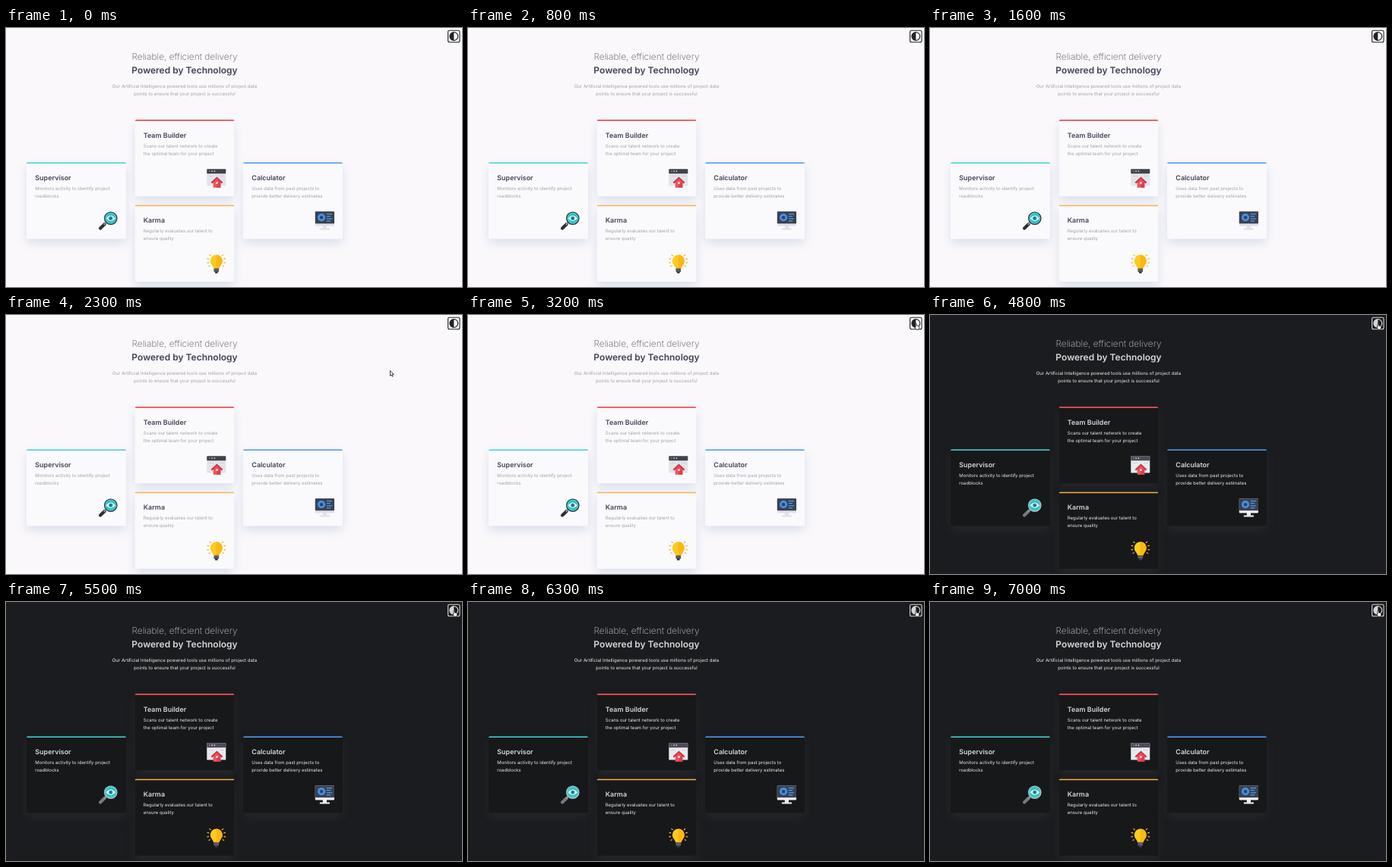
Animation, 600 px wide and 342 px high, one loop 7.1 s. Source, as an HTML page with a canvas:

```html
<!DOCTYPE html>
<html lang="en">
<head>
<meta charset="utf-8">
<title>Four cards, light and dark</title>
<style>
  html, body { margin: 0; width: 100%; height: 100%; overflow: hidden; background: #faf8fb; }
  canvas { display: block; width: 600px; height: 342px; }
</style>
</head>
<body>
<canvas id="stage"></canvas>
<script>
const W = 600, H = 342, LOOP = 7100, STEP = 100, SWITCH = 3400;
const canvas = document.getElementById('stage');
const dpr = window.devicePixelRatio || 1;
canvas.width = W * dpr;
canvas.height = H * dpr;
const ctx = canvas.getContext('2d');

const LIGHT = {
  bg: '#faf8fb', card: '#faf9fc', shadow: 'rgba(140,165,200,.32)',
  thin: '#4a4c5c', bold: '#414354', text: '#a2a2aa',
  button: '#222326', lensRim: '#33363e', handle: '#2d3036',
  pane: '#e3e4ea', bar: '#3f424c', stand: '#dfe1e8'
};
const DARK = {
  bg: '#1b1c1f', card: '#17181a', shadow: 'rgba(70,73,80,.3)',
  thin: '#cfcfd0', bold: '#d7d7d8', text: '#ececec',
  button: '#d6d6d7', lensRim: '#b9c3c6', handle: '#77797c',
  pane: '#e9eaf0', bar: '#4b4c57', stand: '#f1f2f5'
};

const CARDS = [
  { x: 27, y: 177.2, color: '#44d3d2', title: 'Supervisor', icon: magnifier,
    lines: ['Monitors activity to identify project', 'roadblocks'] },
  { x: 169.5, y: 121, color: '#e95355', title: 'Team Builder', icon: house,
    lines: ['Scans our talent network to create', 'the optimal team for your project'] },
  { x: 169.5, y: 233.4, color: '#f9ae4c', title: 'Karma', icon: bulb,
    lines: ['Regularly evaluates our talent to', 'ensure quality'] },
  { x: 312, y: 177.2, color: '#4f9cf0', title: 'Calculator', icon: monitor,
    lines: ['Uses data from past projects to', 'provide better delivery estimates'] }
];
const CARD_W = 131, CARD_H = 101.6;

// Pointer path: time, x, y of the tip
const PATH = [
  [1800, 440, 322], [2000, 464, 196], [2300, 505.5, 73.5], [2500, 555, 30],
  [2700, 576, 18], [2900, 586, 13], [3200, 588.5, 11]
];

function text(str, x, y, size, weight, color, align = 'left') {
  ctx.font = `${weight} ${size}px Inter, "Open Sans", sans-serif`;
  ctx.textAlign = align;
  ctx.fillStyle = color;
  ctx.fillText(str, x, y);
}

function rect(x, y, w, h, color, r = 0) {
  ctx.beginPath();
  ctx.roundRect(x, y, w, h, r);
  ctx.fillStyle = color;
  ctx.fill();
}

function disc(x, y, r, color, from = 0, to = Math.PI * 2) {
  ctx.beginPath();
  ctx.arc(x, y, r, from, to);
  ctx.fillStyle = color;
  ctx.fill();
}

function ring(x, y, r, width, color) {
  ctx.beginPath();
  ctx.arc(x, y, r, 0, Math.PI * 2);
  ctx.lineWidth = width;
  ctx.strokeStyle = color;
  ctx.stroke();
}

function line(x1, y1, x2, y2, width, color, cap = 'butt') {
  ctx.beginPath();
  ctx.moveTo(x1, y1);
  ctx.lineTo(x2, y2);
  ctx.lineWidth = width;
  ctx.lineCap = cap;
  ctx.strokeStyle = color;
  ctx.stroke();
}

function poly(points, color) {
  ctx.beginPath();
  points.forEach(([x, y]) => ctx.lineTo(x, y));
  ctx.closePath();
  ctx.fillStyle = color;
  ctx.fill();
}

// Icons live in a 25 by 25 box
function magnifier(c) {
  line(2.3, 22.8, 8, 17.2, 4.2, c.handle, 'round');
  line(7, 18, 10, 15, 2, '#8c9298');
  disc(16, 9.4, 8.8, c.lensRim);
  disc(16, 9.4, 7.6, '#27b9c0');
  ring(16, 9.4, 6.4, 1, '#5fd6d8');
  // Eye in the lens
  ctx.beginPath();
  ctx.moveTo(10, 9.4);
  ctx.quadraticCurveTo(16, 1.8, 22, 9.4);
  ctx.quadraticCurveTo(16, 17, 10, 9.4);
  ctx.fillStyle = '#eefafa';
  ctx.fill();
  disc(16, 9.4, 2.7, '#22a9b3');
  disc(16, 9.4, 1.2, '#2c5560');
}

function house(c) {
  rect(0, 0.6, 25, 22.4, c.pane, 0.6);
  rect(0, 0.6, 25, 6, c.bar, 0.6);
  [3.5, 6.8, 10.1].forEach((x, i) => disc(x, 3.5, 0.9, i ? '#d9dbe2' : '#e9565f'));
  rect(2.5, 9.5, 6, 1, '#cfd1da');
  rect(17, 9.5, 5.5, 1, '#cfd1da');
  rect(8.4, 17, 9.6, 8.2, '#f0525f');
  rect(13.2, 17, 4.8, 8.2, '#dc3f4e');
  poly([[13.2, 10.8], [21.1, 18.2], [19.5, 19.9], [13.2, 14], [6.9, 19.9], [5.3, 18.2]], '#c93646');
  poly([[13.2, 13.4], [18.5, 18.6], [7.9, 18.6]], '#ec4b59');
  rect(11.9, 17.6, 2.6, 2.8, '#f3d7da');
}

function bulb() {
  ctx.translate(0, 0.8);
  for (const side of [-1, 1])
    for (const a of [-0.75, -0.28, 0.18, 0.62]) {
      const dx = side * Math.cos(a), dy = Math.sin(a);
      line(12.5 + dx * 9.9, 9 + dy * 9.9, 12.5 + dx * 12.6, 9 + dy * 12.6, 1.2, '#f6b436');
    }
  disc(12.5, 8.6, 8, '#fdcb1f');
  disc(12.5, 8.6, 8, '#fbb714', -Math.PI / 2, Math.PI / 2);
  poly([[6.2, 13.2], [18.8, 13.2], [15.8, 19], [9.2, 19]], '#fdc81e');
  poly([[12.5, 13.2], [18.8, 13.2], [15.8, 19], [12.5, 19]], '#fbb714');
  rect(9.2, 18.8, 6.6, 4.3, '#4a4e58', 0.6);
  line(9.2, 20.9, 15.8, 20.9, 0.6, '#858b96');
  rect(10.5, 23.1, 4, 2, '#363a43', 0.8);
}

function monitor(c) {
  rect(10, 18, 5.2, 5, c.stand);
  rect(6, 22.6, 13.2, 2, c.stand, 0.5);
  rect(0, 0.4, 25.2, 19.2, c.stand, 0.8);
  rect(0, 0.4, 25.2, 16, '#3b414e', 0.8);
  ring(8.3, 8.4, 3.7, 2.8, '#3f91ee');
  [3.8, 6.9, 10, 13.1].forEach((y, i) => {
    rect(14.8, y - 0.6, i % 2 ? 5.5 : 7.5, 1.2, '#4a9bf4', 0.5);
  });
}

function drawCard(card, c) {
  const { x, y } = card;
  ctx.save();
  ctx.shadowColor = c.shadow;
  ctx.shadowBlur = 13 * dpr;
  ctx.shadowOffsetY = 5.6 * dpr;
  rect(x + 1, y + 1, CARD_W - 2, CARD_H - 2, c.card, 2);
  ctx.restore();

  ctx.save();
  ctx.beginPath();
  ctx.roundRect(x, y, CARD_W, CARD_H, 2);
  ctx.clip();
  rect(x, y, CARD_W, CARD_H, c.card);
  rect(x, y, CARD_W, 1.8, card.color);
  ctx.restore();

  text(card.title, x + 11.3, y + 23.5, 8.95, 600, c.bold);
  card.lines.forEach((s, i) => text(s, x + 11.3, y + 36.8 + i * 10, 6, 400, c.text));

  ctx.save();
  ctx.translate(x + 94.8, y + 64.6);
  card.icon(c);
  ctx.restore();
}

function drawButton(c) {
  ctx.beginPath();
  ctx.roundRect(581.6, 3.3, 15.4, 15.4, 2);
  ctx.lineWidth = 1.1;
  ctx.strokeStyle = c.button;
  ctx.stroke();
  ring(589.3, 11, 5.4, 1.2, c.button);
  disc(589.3, 11, 5.4, c.button, Math.PI / 2, Math.PI * 1.5);
}

function outlined(points) {
  ctx.beginPath();
  points.forEach(([x, y]) => ctx.lineTo(x, y));
  ctx.closePath();
  ctx.lineJoin = 'round';
  ctx.lineWidth = 0.8;
  ctx.fillStyle = '#fff';
  ctx.strokeStyle = '#18191c';
  ctx.fill();
  ctx.stroke();
}

function arrow() {
  outlined([[0, 0], [0, 6.8], [1.5, 5.4], [2.6, 7.8], [3.7, 7.3], [2.7, 5], [4.7, 4.8]]);
}

function hand() {
  outlined([[0.4, 0.6], [1.2, 0.2], [1.8, 0.8], [1.9, 3], [4.6, 3.6], [5.2, 4.4], [5, 6.6],
    [4.3, 8.2], [1.4, 8.2], [-0.6, 5.6], [-0.4, 4.8], [0.5, 5.2]]);
}

function pointerAt(t) {
  if (t < PATH[0][0]) return null;
  const next = PATH.findIndex(p => p[0] > t);
  if (next < 0) return PATH[PATH.length - 1].slice(1);
  const [t0, x0, y0] = PATH[next - 1], [t1, x1, y1] = PATH[next];
  const k = (t - t0) / (t1 - t0);
  return [x0 + (x1 - x0) * k, y0 + (y1 - y0) * k];
}

function draw(t) {
  const c = t < SWITCH ? LIGHT : DARK;
  ctx.setTransform(dpr, 0, 0, dpr, 0, 0);
  ctx.textRendering = 'geometricPrecision';
  rect(0, 0, W, H, c.bg);

  text('Reliable, efficient delivery', 235, 42, 11.95, 250, c.thin, 'center');
  text('Powered by Technology', 235, 59.5, 12, 600, c.bold, 'center');
  text('Our Artificial Intelligence powered tools use millions of project data',
    235, 78.7, 6.04, 400, c.text, 'center');
  text('points to ensure that your project is successful', 235, 88.7, 6.04, 400, c.text, 'center');

  CARDS.forEach(card => drawCard(card, c));
  drawButton(c);

  const tip = pointerAt(t);
  if (tip) {
    ctx.translate(tip[0], tip[1]);
    if (tip[0] > 581) hand(); else arrow();
  }
}

const start = performance.now();
function frame() {
  const t = (performance.now() - start) % LOOP;
  draw(Math.floor(t / STEP) * STEP);
  requestAnimationFrame(frame);
}
frame();
</script>
</body>
</html>
```
